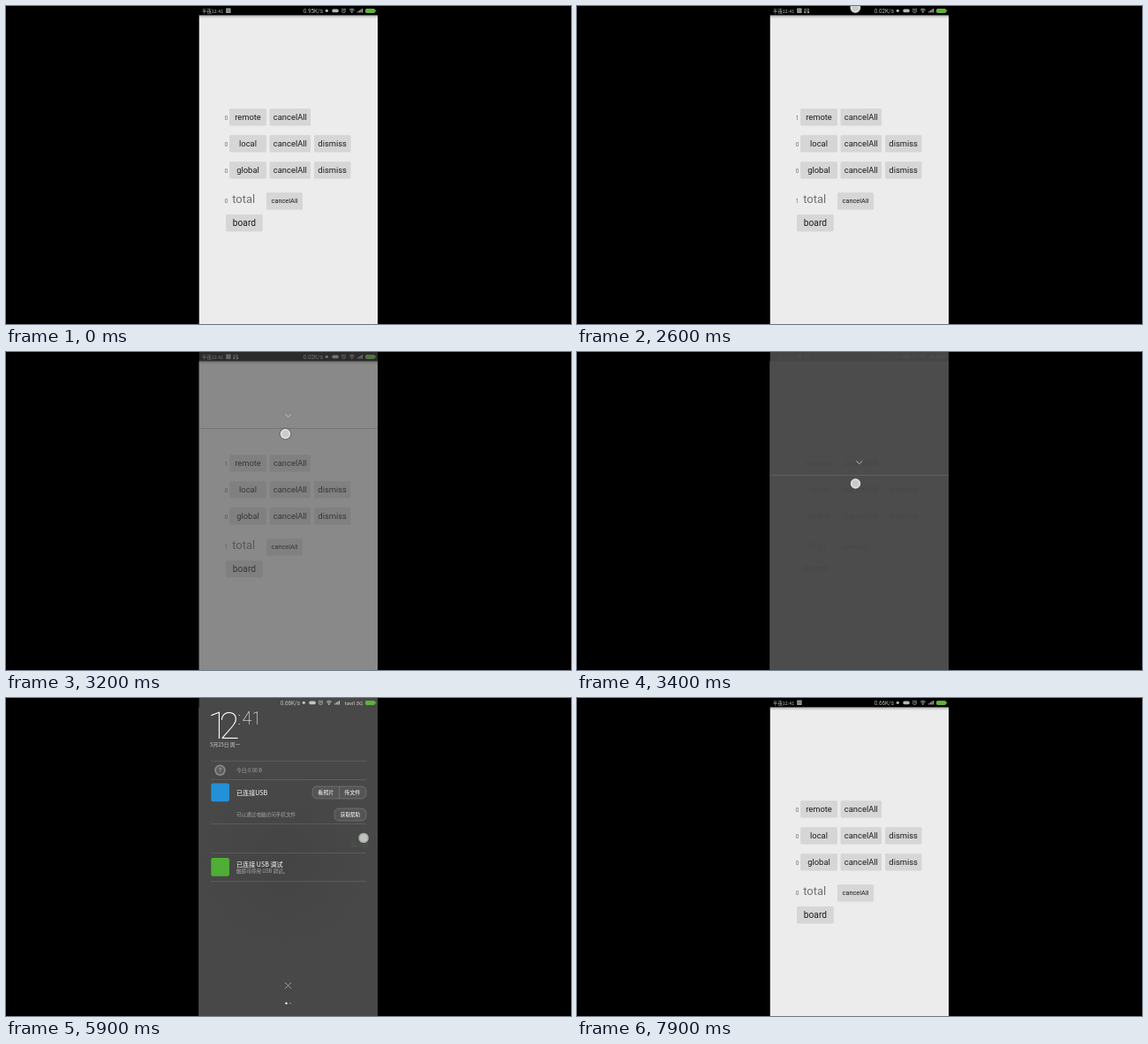
An HTML page with a canvas for the animation above (8 s loop, 640 by 360 pixels).

```html
<!DOCTYPE html>
<html lang="zh">
<head>
<meta charset="utf-8">
<style>
html, body { margin: 0; width: 100%; height: 100%; overflow: hidden; background: #000; }
canvas { display: block; width: 640px; height: 360px; }
</style>
</head>
<body>
<canvas id="stage"></canvas>
<script>
const LOOP = 8000, STEP = 100;
const L = 218.5, R = 421, W = R - L, BAR = 10.5;
const LATIN = 'Roboto, "Noto Sans", sans-serif';
const CJK = '"Noto Sans CJK SC", "Noto Sans CJK", "Noto Sans CJK JP", sans-serif';
const canvas = document.getElementById('stage');
const c = canvas.getContext('2d');
const dpr = window.devicePixelRatio || 1;
canvas.width = 640 * dpr;
canvas.height = 360 * dpr;

const clamp = v => Math.max(0, Math.min(1, v));
const span = (t, a, b) => clamp((t - a) / (b - a));
const mix = (a, b, k) => a + (b - a) * k;
const easeOut = k => 1 - (1 - k) ** 3;
const smooth = k => k * k * (3 - 2 * k);

function text(s, x, y, size, color, o = {}) {
  c.font = `${o.weight || 400} ${size}px ${o.font || CJK}`;
  c.textAlign = o.align || 'left';
  c.textBaseline = 'alphabetic';
  c.fillStyle = color;
  c.fillText(s, x, y);
}

function box(x, y, w, h, color, r = 0) {
  c.beginPath();
  c.roundRect(x, y, w, h, r);
  c.fillStyle = color;
  c.fill();
}

function disc(x, y, r, color) {
  c.beginPath();
  c.arc(x, y, r, 0, Math.PI * 2);
  c.fillStyle = color;
  c.fill();
}

function line(color, width, ...p) {
  c.beginPath();
  for (let i = 0; i < p.length; i += 2) c.lineTo(p[i], p[i + 1]);
  c.strokeStyle = color;
  c.lineWidth = width;
  c.stroke();
}

function fade(alpha, draw) {
  if (alpha <= 0) return;
  c.save();
  c.globalAlpha *= alpha;
  draw();
  c.restore();
}

// Status bar symbols; x is the left end of the speed text
function symbols(x, speed, color) {
  text(speed, x, 7.6, 6.3, color, { font: LATIN });
  disc(x + 26.5, 5.3, 1.6, color);
  box(x + 32.5, 3.6, 7.5, 3.6, color, 1.6);
  c.strokeStyle = color;
  c.lineWidth = .7;
  c.beginPath();
  c.arc(x + 45.7, 5.6, 2, 0, 7);
  c.stroke();
  line(color, .6, x + 45.7, 4.4, x + 45.7, 5.7, x + 46.6, 5.7);
  line(color, .7, x + 43.2, 3.6, x + 44.4, 2.7);
  line(color, .7, x + 48.2, 3.6, x + 47, 2.7);
  c.lineWidth = .8;
  for (const r of [1.6, 3, 4.4]) {
    c.beginPath();
    c.arc(x + 55, 7.6, r, -2.3, -.84);
    c.stroke();
  }
  disc(x + 55, 7.2, .7, color);
  for (let i = 0; i < 4; i++) {
    const h = 1.4 + i * 1.1;
    box(x + 61.3 + i * 1.6, 7.6 - h, 1.1, h, color);
  }
}

function battery() {
  box(407, 2.9, 11, 5, '#5fb13c', 1.6);
  box(418.2, 4.3, .9, 2.2, '#5fb13c');
}

function portrait(x, y, s) {
  c.save();
  c.beginPath();
  c.roundRect(x, y, s, s, s * .07);
  c.clip();
  box(x, y, s, s, '#4d6b50');
  box(x, y + s * .68, s, s * .32, '#a3a59f');
  box(x + s * .25, y + s * .28, s * .5, s * .5, '#2b2023', s * .15);
  box(x + s * .38, y + s * .32, s * .24, s * .3, '#85403f', s * .06);
  box(x + s * .34, y + s * .7, s * .3, s * .3, '#1c1a1c');
  disc(x + s * .5, y + s * .18, s * .15, '#241d1e');
  c.restore();
}

function button(label, x, y, w, size, pressed) {
  box(x, y + .5, w, 18.8, 'rgba(0,0,0,.1)', 1);
  box(x, y, w, 18.5, pressed ? '#c2c2c2' : '#d6d6d6', 1);
  text(label, x + w / 2, y + 9.4 + size * .35, size, '#1b1b1b', { font: LATIN, align: 'center' });
}

function home(t) {
  const count = t >= 1000 && t < 6000 ? 1 : 0;
  const speed = t < 100 ? '0.95K/s' : t < 4300 ? '0.02K/s' : '0.66K/s';
  box(L, 0, W, BAR, '#000');
  box(L, BAR, W, 360 - BAR, '#ececec');
  const g = c.createLinearGradient(0, BAR, 0, 14);
  g.addColorStop(0, 'rgba(0,0,0,.25)');
  g.addColorStop(1, 'rgba(0,0,0,0)');
  box(L, BAR, W, 4, g);

  text('半夜12:41', 222, 7.5, 5.4, '#bdbdbd');
  box(249.2, 2.6, 5.4, 5.4, '#9c9c9c', .6);
  line('#555', .6, 250.2, 4.4, 253.6, 4.4);
  line('#555', .6, 250.2, 6.1, 253.6, 6.1);
  if (count) portrait(257.2, 2.4, 5.8);
  symbols(336.8, speed, '#b5b5b5');
  battery();

  const rows = [['remote', 116.2, count], ['local', 146.3, 0], ['global', 176.3, 0]];
  rows.forEach(([name, y, n], i) => {
    text(n, 249.4, y + 12.9, 7, '#777', { font: LATIN, align: 'center' });
    button(name, 253.3, y, 41.4, 9.4, !i && t >= 600 && t < 1000);
    button('cancelAll', 298.7, y, 46.3, 9.4);
    if (i) button('dismiss', 349, y, 41.3, 9.4);
  });
  text(count, 249.4, 223.2, 7, '#777', { font: LATIN, align: 'center' });
  text('total', 256.2, 223.2, 13, '#707070', { font: LATIN });
  button('cancelAll', 295, 211.2, 41, 7.4);
  button('board', 249.2, 236, 41.4, 10.2);
}

function rule(y) {
  line('rgba(255,255,255,.14)', .8, 232, y, 408, y);
}

function pill(x, y, w, h) {
  box(x, y, w, h, 'rgba(255,255,255,.07)', 5);
  c.strokeStyle = 'rgba(255,255,255,.24)';
  c.lineWidth = .7;
  c.stroke();
}

function header() {
  symbols(310.8, '0.66K/s', '#c4c4c4');
  text('tavil 3G', 404.3, 7.6, 6.2, '#d0d0d0', { font: LATIN, align: 'right' });
  battery();
  const thin = { font: LATIN, weight: 100 };
  text('1', 228.6, 45.5, 42, '#fff', thin);
  text('2', 241.6, 45.5, 42, '#fff', thin);
  text(':', 262.6, 29.6, 20, '#fff', thin);
  text('4', 267.4, 29.6, 20, '#fff', thin);
  text('1', 278.6, 29.6, 20, '#fff', thin);
  text('5月25日 周一', 231.3, 55, 5.8, '#d0d0d0');
}

function usbRows() {
  rule(71.5);
  disc(242.5, 81.8, 6.2, '#8b8b8b');
  disc(242.5, 81.8, 4.6, '#5e5e5e');
  text('?', 242.5, 84.2, 6.8, '#bbb', { font: LATIN, align: 'center' });
  text('今日:0.00 B', 261, 84, 5.7, '#a5a5a5');
  rule(92.5);
  box(232.3, 96.5, 20.7, 20.7, '#2490d8', 2.2);
  text('已连接USB', 261, 109.6, 7.1, '#fff');
  pill(347, 100, 61, 14);
  line('rgba(255,255,255,.24)', .7, 377.5, 100, 377.5, 114);
  text('看照片', 362.5, 109.2, 6.1, '#fff', { align: 'center', weight: 500 });
  text('传文件', 392.3, 109.2, 6.1, '#fff', { align: 'center', weight: 500 });
  text('可以通过电脑访问手机文件', 261, 134.2, 5.6, '#a5a5a5');
  pill(372, 125, 36, 14);
  text('获取帮助', 390, 134.1, 5.6, '#fff', { align: 'center', weight: 500 });
  rule(142.5);
}

function message() {
  portrait(232.8, 148.8, 20.2);
  text('Plain Owl', 261, 158.8, 7.5, '#dedede', { font: LATIN });
  text('hello world', 261, 166, 5.9, '#aaa', { font: LATIN });
  text('上午12:41', 408, 158.2, 6.3, '#a5a5a5', { align: 'right' });
}

function debugRow(dy) {
  c.save();
  c.translate(0, dy);
  box(232.3, 181, 20.7, 20.7, '#4fae35', 2.2);
  text('已连接 USB 调试', 261, 190.6, 7.1, '#fff', { weight: 500 });
  text('触摸可停用 USB 调试。', 261, 198.2, 5.6, '#aaa');
  rule(207.5);
  c.restore();
}

// Each block drops into place as it appears
function block(t, start, out, draw) {
  const k = easeOut(span(t, start, start + 500));
  fade(k * out, () => {
    c.translate(0, -10 * (1 - k));
    draw();
  });
}

function panel(t) {
  const out = 1 - span(t, 7250, 7550);
  const swipe = smooth(span(t, 5200, 6000));
  const shut = smooth(span(t, 6100, 6400));
  block(t, 3450, out, header);
  block(t, 3550, out, usbRows);
  block(t, 3650, out, () => {
    fade(1 - swipe, () => {
      c.translate(165 * swipe, 0);
      message();
    });
    fade(1 - shut, () => rule(175.5));
  });
  block(t, 3750, out, () => debugRow(-32.2 * shut));
  fade(span(t, 3600, 4200) * (1 - shut), () => {
    line('#aaa', .9, 316, 322, 323, 329);
    line('#aaa', .9, 323, 322, 316, 329);
  });
  fade(span(t, 3500, 4000) * out, () => {
    disc(317.5, 345.6, 1.2, '#fff');
    disc(322, 345.6, .9, '#8a8a8a');
  });
}

const pullY = t => 2 + 147 * span(t, 2600, 3400) ** 1.68;
const pushY = t => 313.5 - 285 * smooth(span(t, 7200, 7800));

function shade(t) {
  const p = t < 7200 ? (pullY(t) - 2) / 147 : 1 - smooth(span(t, 7200, 7900));
  const full = mix(.97, 1, span(t, 3400, 3700));
  fade(p * full, () => box(L, 0, W, 360, '#484848'));
  if (t >= 3500 && t < 7300) {
    const g = c.createRadialGradient(315, 185, 10, 315, 185, 105);
    g.addColorStop(0, 'rgba(0,0,0,.05)');
    g.addColorStop(1, 'rgba(0,0,0,0)');
    box(L, BAR, W, 350, g);
  }

  let tip = null, seen = clamp(p * 2);
  if (t > 2600 && t <= 3400) tip = 30 + 95 * (pullY(t) - 48) / 101;
  else if (t > 3400 && t < 3800) {
    const k = span(t, 3400, 3800);
    tip = 125 + 200 * easeOut(k);
    seen = 1 - k;
  } else if (t > 7300 && t < 7900) tip = pushY(t) - 25;
  if (tip === null) return;
  fade(seen, () => {
    line('#c4c4c4', .9, 316.4, tip - 1.6, 319.7, tip + 1.6, 323, tip - 1.6);
    fade(p, () => line('#626262', .8, L, tip + 14.5, R, tip + 14.5));
  });
}

function finger(x, y, alpha = 1) {
  fade(alpha, () => {
    disc(x, y, 7, 'rgba(70,70,70,.35)');
    disc(x, y, 5.7, '#e2e2e2');
    disc(x, y, 4, '#cbcbcb');
  });
}

function touch(t) {
  if (t >= 600 && t < 1100) finger(275, 127, t < 1000 ? 1 : .5);
  else if (t >= 2600 && t <= 3500) {
    const x = t < 3000 ? mix(315.3, 317.4, span(t, 2600, 3000)) : mix(317.4, 315.5, span(t, 3000, 3400));
    finger(x, pullY(t), t > 3400 ? .4 : 1);
  } else if (t >= 4400 && t < 6100) {
    const k = smooth(span(t, 5200, 6000));
    finger(266.3 + 145 * k, 158.4, t < 4500 ? .5 : 1 - span(t, 5800, 6100));
  } else if (t >= 6800 && t < 7900) {
    finger(275.8, pushY(t), t < 6900 ? .5 : 1 - span(t, 7600, 7900));
  }
}

function render(t) {
  c.setTransform(dpr, 0, 0, dpr, 0, 0);
  c.fillStyle = '#000';
  c.fillRect(0, 0, 640, 360);
  c.save();
  c.beginPath();
  c.rect(L, 0, W, 360);
  c.clip();
  home(t);
  shade(t);
  if (t >= 3500 && t < 7900) panel(t);
  touch(t);
  c.restore();
}

const start = performance.now();
function tick(now) {
  const t = Math.max(0, now - start) % LOOP;
  render(Math.floor(t / STEP) * STEP);
  requestAnimationFrame(tick);
}
render(0);
requestAnimationFrame(tick);
</script>
</body>
</html>
```
